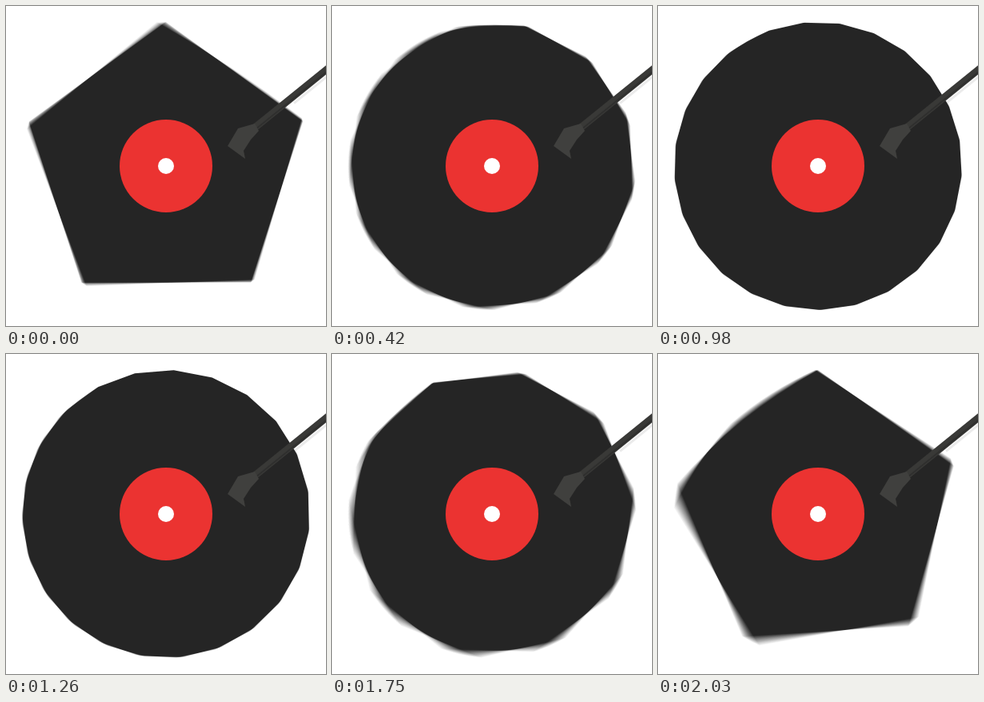
Recreate the animation shown at these times as an HTML page with a canvas. Size 400x400 px, loop 2.1 s.

```html
<!DOCTYPE html>
<html lang="en">
<head>
<meta charset="utf-8">
<title>Spinning record</title>
<style>
  html, body { margin: 0; width: 100%; height: 100%; overflow: hidden; background: #fff; }
  canvas { display: block; width: 400px; height: 400px; }
</style>
</head>
<body>
<canvas id="stage" width="400" height="400"></canvas>
<script>
const ctx = document.getElementById('stage').getContext('2d');
const TAU = Math.PI * 2;
const SIZE = 400, CENTER = SIZE / 2, RADIUS = 180;
const MIN_SIDES = 5, MAX_SIDES = 25.5;
const STEP_MS = 70, STEPS = 30;
const SHUTTER = 0.38;  // share of a step that is blurred together
const SAMPLES = 17;    // divides 255, so full coverage stays opaque

const lerp = (a, b, t) => a + (b - a) * t;
const mid = (p, q) => [(p[0] + q[0]) / 2, (p[1] + q[1]) / 2];

// Angles run clockwise from the top.
function polar(angle, r) {
  return [CENTER + r * Math.sin(angle), CENTER - r * Math.cos(angle)];
}

function disc(r, color) {
  ctx.beginPath();
  ctx.arc(CENTER, CENTER, r, 0, TAU);
  ctx.fillStyle = color;
  ctx.fill();
}

function line(x1, y1, x2, y2, width, color) {
  ctx.beginPath();
  ctx.moveTo(x1, y1);
  ctx.lineTo(x2, y2);
  ctx.lineWidth = width;
  ctx.strokeStyle = color;
  ctx.stroke();
}

// The side count eases up and back down over one loop.
function sidesAt(k) {
  const u = 1 - Math.abs(1 - k / (STEPS / 2));
  return lerp(MIN_SIDES, MAX_SIDES, u * u * (3 - 2 * u));
}

// Polygon with a fractional side count: a soft extra corner grows
// out of the closing gap and sharpens as it becomes whole.
function fillRecord(k) {
  const n = sidesAt(k), whole = Math.floor(n), part = n - whole;
  const step = TAU / n;
  const turn = -TAU / MIN_SIDES * k / STEPS;
  const first = polar(turn + step, RADIUS);
  const last = polar(turn + whole * step, RADIUS);
  const tip = polar(turn + step * (1 - part) / 2,
    lerp(RADIUS * Math.cos(step / 2), RADIUS, part));
  const base = mid(first, last);

  const curveTo = (from, to) => {
    const [x, y] = mid(from, to);
    const soft = (1 - part) / 2;
    ctx.quadraticCurveTo(x + soft * (tip[0] - base[0]), y + soft * (tip[1] - base[1]), ...to);
  };

  ctx.beginPath();
  for (let i = 1; i <= whole; i++) ctx.lineTo(...polar(turn + i * step, RADIUS));
  curveTo(last, tip);
  curveTo(tip, first);
  ctx.fill();
}

function drawRecord(k) {
  ctx.globalCompositeOperation = 'lighter';
  ctx.globalAlpha = 1 / SAMPLES;
  ctx.fillStyle = '#000';
  for (let s = 0; s < SAMPLES; s++) fillRecord(k + SHUTTER * s / (SAMPLES - 1));
  ctx.globalAlpha = 1;
  ctx.globalCompositeOperation = 'source-in';
  ctx.fillStyle = '#252525';
  ctx.fillRect(0, 0, SIZE, SIZE);
  ctx.globalCompositeOperation = 'source-over';
  disc(58, '#eb3331');
  disc(10, '#fff');
}

function drawArm() {
  line(410, 81, 360, 121.5, 3, 'rgba(0,0,0,.08)');
  line(410, 72, 306, 156, 9, '#393937');
  line(410, 75, 312, 154, 2, '#2f2f2e');
  const head = new Path2D('M311 147 L290 153 L277 175 L299 191 L297 181 L306 167 L316 156 Z');
  ctx.fillStyle = '#40403e';
  ctx.fill(head);
}

let shown = -1;
function render(now) {
  const k = Math.floor(Math.max(0, now - start) / STEP_MS) % STEPS;
  if (k !== shown) {
    shown = k;
    ctx.clearRect(0, 0, SIZE, SIZE);
    drawRecord(k);
    drawArm();
  }
  requestAnimationFrame(render);
}

const start = performance.now();
render(start);
</script>
</body>
</html>
```
